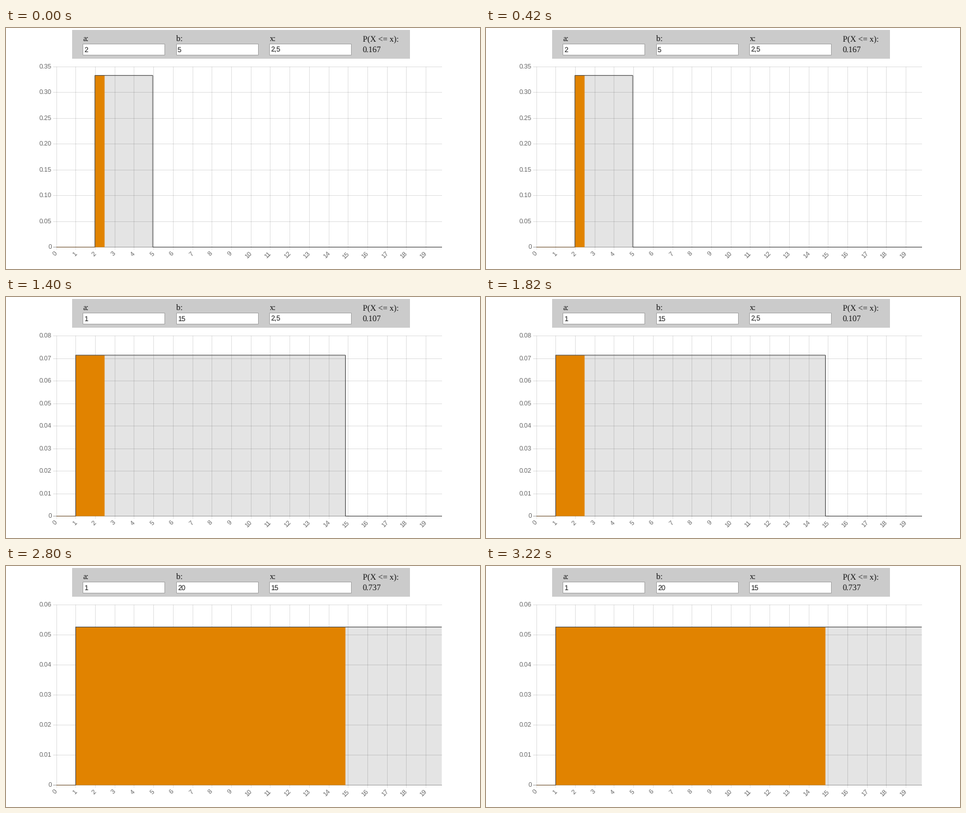
Animation, 724 px wide and 369 px high, one loop 3.5 s. Source, as a matplotlib script:

```python
import matplotlib.pyplot as plt
import numpy as np
from matplotlib.animation import FuncAnimation
from matplotlib.patches import Rectangle

plt.rcParams["text.hinting"] = "none"

W, H, DPI = 724, 369, 100
LEFT, RIGHT, TOP, BASE = 77, 666, 59.5, 335.5
GRID_STEP, UNIT = 29.72, 29.43
ORANGE, SHADE, INK = "#e18300", "#e4e4e4", "#4c4c4c"

# a, b, x, top of the y axis, y tick step
STATES = [
    (2, 5, 2.5, 0.35, 0.05),
    (2, 10, 2.5, 0.14, 0.02),
    (1, 15, 2.5, 0.08, 0.01),
    (1, 20, 7, 0.06, 0.01),
    (1, 20, 15, 0.06, 0.01),
]

fig = plt.figure(figsize=(W / DPI, H / DPI), dpi=DPI, facecolor="white")
ax = fig.add_axes([0, 0, 1, 1])


def crisp(v):
    """Centre of the pixel that holds v."""
    return np.floor(v) + 0.5


def text(x, y, s, px, font="Liberation Sans", color="#111111", **kw):
    ax.text(x, y, s, fontsize=px * 72 / DPI, family=font, color=color,
            va="baseline", **kw)


def line(xs, ys, color, z, alpha=1):
    ax.plot(xs, ys, color=color, lw=72 / DPI, alpha=alpha, zorder=z,
            solid_capstyle="butt", solid_joinstyle="miter", snap=False)


def box(x0, y0, x1, y1, color, z, edge="none"):
    ax.add_patch(Rectangle((x0, y0), x1 - x0, y1 - y0, facecolor=color,
                           edgecolor=edge, lw=72 / DPI, zorder=z, snap=False))


def number(v):
    return f"{v:g}".replace(".", ",")


def draw_header(a, b, x):
    box(101, 3, 617, 47, "#cbcbcb", 1)
    fields = zip((117.5, 260.5, 402.5), "abx", (a, b, x))
    for left, name, value in fields:
        text(left, 20, name + ":", 12.6, "Liberation Serif")
        box(left, 24.5, left + 125, 41.5, "white", 2, "#a9a9a9")
        text(left + 1.5, 37, number(value), 10.7)
    text(545, 20, "P(X <= x):", 12.6, "Liberation Serif")
    prob = (x - a) / (b - a) + 1e-9
    text(545, 37, f"{prob:.3f}", 12.6, "Liberation Serif")


def draw_grid(top, step):
    count = round(top / step)
    for i in range(count + 1):
        y = crisp(BASE - (BASE - TOP) * i / count)
        line([LEFT - 5, RIGHT], [y, y], "black", 3, 0.11 if i else 0.3)
        text(70, y + 3.4, f"{i * step:.2f}" if i else "0", 9.8,
             color="#666666", ha="right")
    for k in range(20):
        x = crisp(LEFT + GRID_STEP * k)
        line([x, x], [TOP, BASE + 4], "black", 3, 0.11)
        text(x + 2.2, BASE + 10.3, str(k), 9.8, color="#666666", ha="right",
             rotation=45, rotation_mode="anchor")


def draw_density(a, b, x, top):
    xa, xb, xx = (min(LEFT + UNIT * v, RIGHT) for v in (a, b, x))
    y = BASE - (BASE - TOP) / (b - a) / top
    box(xa, y, xb, BASE, SHADE, 2)
    box(xa, y, xx, BASE, ORANGE, 4)
    line([LEFT, xa], [BASE, BASE], "#7d6040", 5)
    line([xa, xa, xb], [BASE, y, y], INK, 5)
    if xb < RIGHT - 1:
        line([xb, xb, RIGHT], [y, BASE, BASE], INK, 5)


def draw(i):
    ax.clear()
    ax.set_xlim(0, W)
    ax.set_ylim(H, 0)
    ax.axis("off")
    a, b, x, top, step = STATES[i]
    draw_header(a, b, x)
    draw_grid(top, step)
    draw_density(a, b, x, top)
    return []


anim = FuncAnimation(fig, draw, frames=len(STATES), interval=700,
                     init_func=lambda: draw(0), repeat=True, repeat_delay=0)
plt.show()
```
